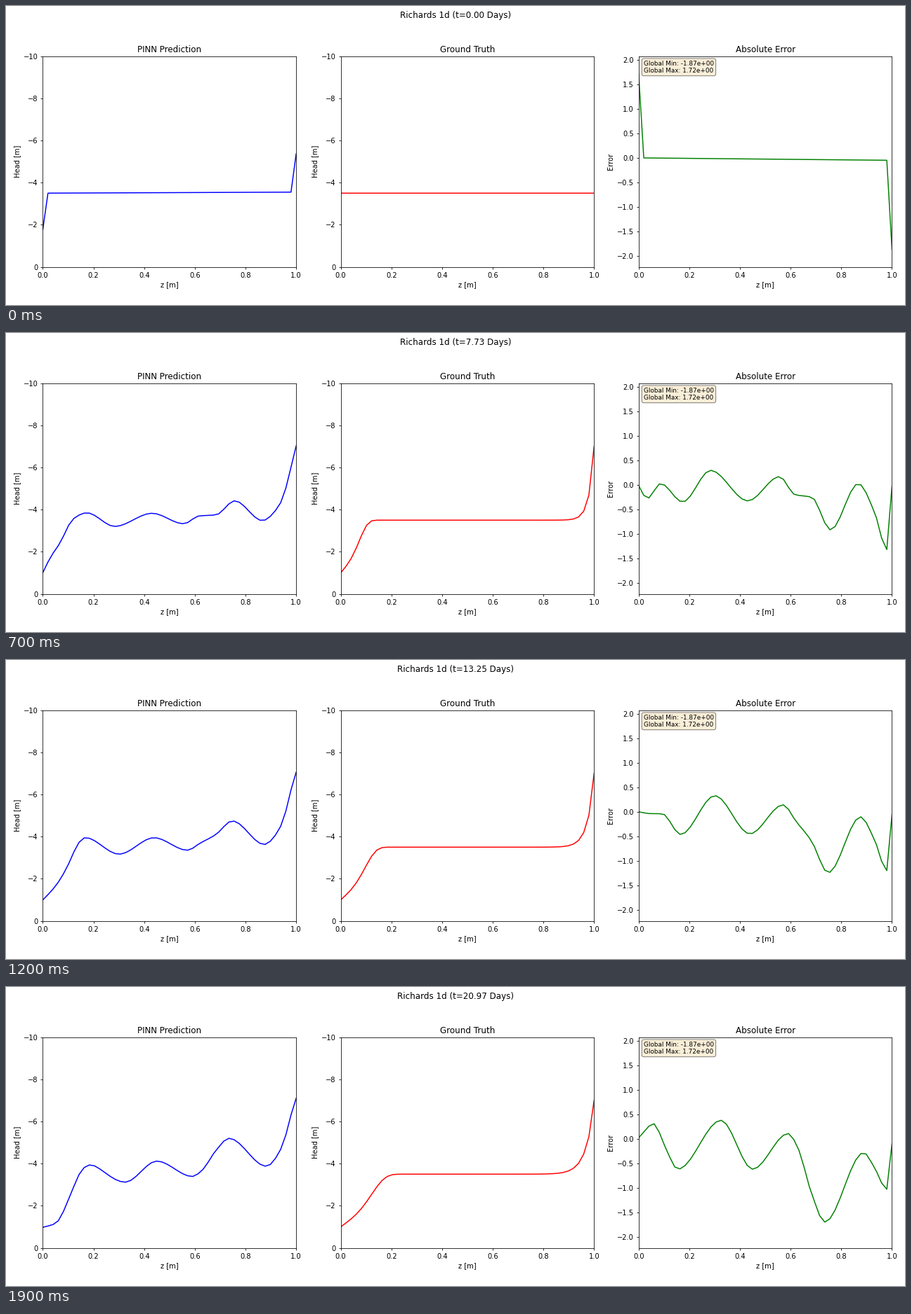
Write a matplotlib script that moves like this. It is 1280 px wide and 427 px high and loops after 2000 ms.

```python
import numpy as np
import matplotlib.pyplot as plt
from matplotlib.animation import FuncAnimation

plt.rcParams["font.family"] = "DejaVu Sans"

FRAMES, INTERVAL = 20, 100
DAYS_PER_STEP = 1.1038
H0 = -3.5                   # initial head
ERR_MIN, ERR_MAX = -1.87, 1.72
z = np.linspace(0, 1, 50)

# Turning points (z, error) of the error curve, early and at the end.
EARLY_STEP, LAST_STEP = 3, FRAMES - 1
EARLY = np.array([(0, -.02), (.025, -.48), (.082, .08), (.18, -.26), (.27, .27),
                  (.425, -.23), (.545, .19), (.612, -.2), (.685, .02),
                  (.765, -.66), (.86, .13), (.93, -.53), (.98, -1.42), (1, 0)])
LATE = np.array([(0, .02), (.06, .31), (.102, -.13), (.155, -.62), (.325, .38),
                 (.45, -.62), (.59, .11), (.63, -.2), (.68, -1.07),
                 (.735, -1.7), (.888, -.28), (.93, -.58), (.98, -1.03), (1, -.1)])


def truth(step):
    """Wetting front from the left, drying front from the right, both ~ sqrt(t)."""
    if step == 0:
        return np.full_like(z, H0)
    root = np.sqrt(step * DAYS_PER_STEP)
    left, right = z / root, (1 - z) / root
    wet = 2.5 * np.exp(-0.188 * np.sinh(np.minimum(87.5 * left, 6)))
    dry = 3.3 * np.exp(-139 * right) + 0.2 * np.exp(-900 * right)
    return H0 + wet - dry


def smooth(x, y):
    """Monotone cubic through the points, sampled on the grid."""
    h = np.diff(x)
    sec = np.diff(y) / h
    a, b = sec[:-1], sec[1:]
    same = a * b > 0
    inner = np.where(same, 2 * a * b / np.where(same, a + b, 1), 0)
    slope = np.concatenate([sec[:1], inner, sec[-1:]])
    k = np.clip(np.searchsorted(x, z, side="right") - 1, 0, len(h) - 1)
    u = (z - x[k]) / h[k]
    ease = u * u * (3 - 2 * u)
    bend = slope[k] * (1 - u) - slope[k + 1] * u
    return y[k] + (y[k + 1] - y[k]) * ease + h[k] * u * (1 - u) * bend


def error(step):
    if step == 0:
        # Nearly exact inside, wrong only at the two boundaries.
        curve = -0.05 * z
        curve[0], curve[-1] = ERR_MAX, ERR_MIN
        return curve
    mix = (step - EARLY_STEP) / (LAST_STEP - EARLY_STEP)
    points = EARLY + (LATE - EARLY) * mix
    return smooth(points[:, 0], points[:, 1])


def heading(step):
    return f"Richards 1d (t={step * DAYS_PER_STEP:.2f} Days)"


def panel(ax, name, ylabel, ylim, ticks, color):
    ax.set(title=name, xlabel="z [m]", ylabel=ylabel,
           xlim=(0, 1), ylim=ylim, yticks=ticks)
    line, = ax.plot(z, 0 * z, color=color, lw=1.5, snap=False)
    return line


# Slightly above 1280 / 18 so the pixel size never truncates down.
fig, (pred_ax, true_ax, err_ax) = plt.subplots(
    1, 3, figsize=(18, 6.0048), dpi=71.1112, facecolor="white")
title = fig.suptitle(heading(0), fontsize=12, y=0.9825)

head_axis = dict(ylabel="Head [m]", ylim=(0, -10), ticks=np.arange(-10, 1, 2))
margin = 0.1 * (ERR_MAX - ERR_MIN)
pred_line = panel(pred_ax, "PINN Prediction", color="blue", **head_axis)
true_line = panel(true_ax, "Ground Truth", color="red", **head_axis)
err_line = panel(err_ax, "Absolute Error", "Error",
                 (ERR_MIN - margin, ERR_MAX + margin),
                 np.arange(-2, 2.1, 0.5), "green")
err_ax.text(0.02, 0.98,
            f"Global Min: {ERR_MIN:.2e}\nGlobal Max: {ERR_MAX:.2e}",
            transform=err_ax.transAxes, fontsize=9, va="top",
            bbox=dict(boxstyle="round", facecolor="wheat", alpha=0.5))
fig.tight_layout(rect=[0, 0.03, 1, 0.95])


def update(step):
    head, err = truth(step), error(step)
    pred_line.set_ydata(head + err)
    true_line.set_ydata(head)
    err_line.set_ydata(err)
    title.set_text(heading(step))
    return pred_line, true_line, err_line, title


anim = FuncAnimation(fig, update, frames=FRAMES, interval=INTERVAL,
                     repeat=True, repeat_delay=0)
plt.show()
```
